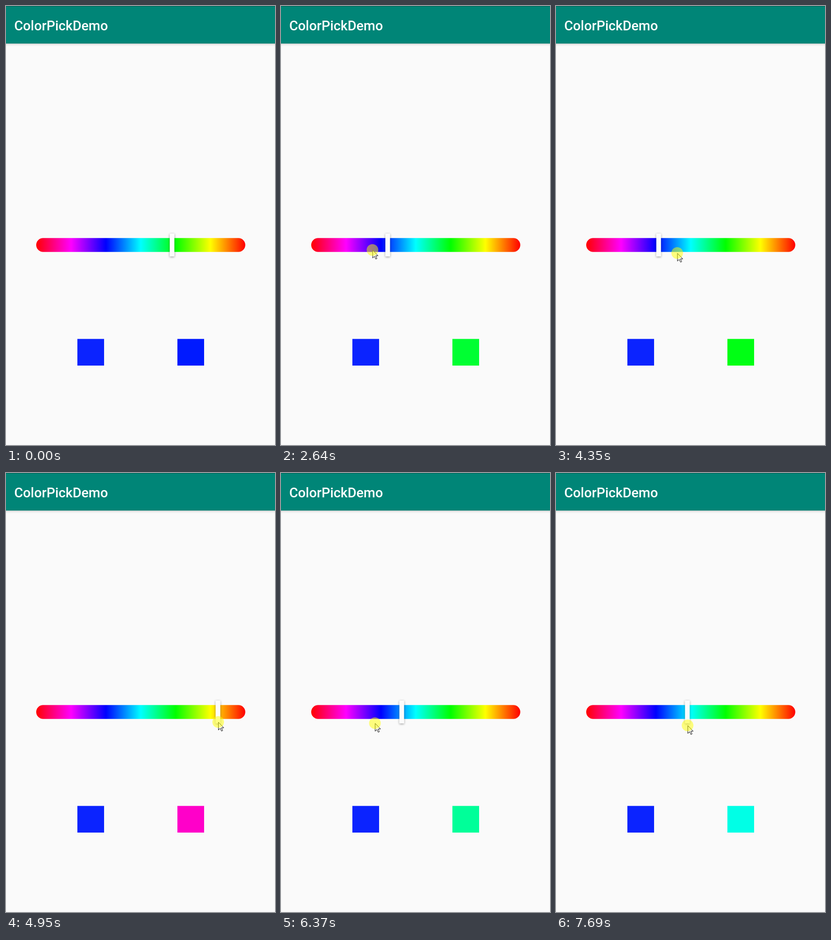
Write an HTML page that moves like this. It is 554 by 901 pixels and loops after 8000 ms.

```html
<!DOCTYPE html>
<html lang="en">
<head>
<meta charset="utf-8">
<title>Color picker</title>
<style>
  html, body { margin: 0; width: 100%; height: 100%; overflow: hidden; background: #fafafa; }
  svg { display: block; width: 100%; height: 100%; }
  text { font: 500 27.7px Roboto, sans-serif; fill: #fff; }
</style>
</head>
<body>
<svg viewBox="0 0 554 901">
  <defs>
    <linearGradient id="hues">
      <stop offset="0" stop-color="#f00"/>
      <stop offset=".1667" stop-color="#f0f"/>
      <stop offset=".3333" stop-color="#00f"/>
      <stop offset=".5" stop-color="#0ff"/>
      <stop offset=".6667" stop-color="#0f0"/>
      <stop offset=".8333" stop-color="#ff0"/>
      <stop offset="1" stop-color="#f00"/>
    </linearGradient>
    <linearGradient id="fade" x2="0" y2="1">
      <stop offset="0" stop-opacity=".2"/>
      <stop offset=".4" stop-opacity=".06"/>
      <stop offset="1" stop-opacity="0"/>
    </linearGradient>
    <filter id="shadow" x="-150%" y="-20%" width="400%" height="140%">
      <feDropShadow dx="0" dy="1.2" stdDeviation="2" flood-opacity=".42"/>
    </filter>
  </defs>
  <rect width="554" height="901" fill="#fafafa"/>
  <rect y="77" width="554" height="6" fill="url(#fade)"/>
  <rect width="554" height="77" fill="#008577"/>
  <rect width="554" height="1" fill="#005f54"/>
  <text x="17" y="50">ColorPickDemo</text>
  <rect x="62.2" y="476.2" width="430.6" height="28.6" rx="14.3" fill="url(#hues)"/>
  <rect id="thumb" x="-4.75" y="467" width="9.5" height="47" rx="1" fill="#fcfcfc" filter="url(#shadow)"/>
  <rect x="147" y="683.3" width="55" height="54.7" fill="#0b23ff"/>
  <rect id="swatch" x="353" y="683.3" width="55" height="54.7"/>
  <g id="pointer">
    <path d="M.5 .5V16.5L4.2 13L6.8 18.7L9.2 17.6L6.7 12H11.5Z" fill="#fff" stroke="#111" stroke-width="1"/>
    <circle id="press" r="12" fill="#ff0" fill-opacity=".5"/>
  </g>
</svg>
<script>
const LOOP = 8000, STEP = 80, LAG = 85, SHOW = 270, PRESS = 1990;
const START = [392, 727], REST = 342;
const el = id => document.getElementById(id);
const thumb = el('thumb'), swatch = el('swatch'), pointer = el('pointer'), press = el('press');

// Strokes of the pointer: first update, last update, final x and y
const strokes = [
  [270, 360, 286, 545], [740, 820, 258, 532], [970, 1520, 338, 496], [1840, 1840, 338, 497],
  [2220, 2870, 136, 502], [3330, 3330, 101, 504], [3940, 4860, 437, 511], [5030, 5280, 465, 506],
  [5430, 5790, 490, 498], [5870, 6680, 66, 520], [6980, 7070, 120, 523], [7150, 7600, 271, 518]
];

const smooth = u => u * u * (3 - 2 * u);

// Pointer position, updated in even steps along each stroke
function pose(t) {
  let [x, y] = START;
  for (const [first, last, toX, toY] of strokes) {
    if (t < first) break;
    const gaps = Math.round((last - first) / STEP);
    const done = gaps ? Math.floor((t - first) / (last - first) * gaps + 1e-6) : 0;
    const u = smooth(Math.min(1, (done + 1) / (gaps + 1)));
    x += (toX - x) * u;
    y += (toY - y) * u;
  }
  return [x, y];
}

function draw(t) {
  const [x, y] = pose(t);
  const pressed = t >= PRESS;
  const pos = pressed ? pose(t - LAG)[0] - 0.5 : REST;
  pointer.setAttribute('visibility', t < SHOW ? 'hidden' : 'visible');
  pointer.setAttribute('transform', `translate(${x} ${y})`);
  press.setAttribute('display', pressed ? 'inline' : 'none');
  thumb.setAttribute('transform', `translate(${pos} 0)`);
  swatch.setAttribute('fill', `hsl(${(pos - 62) * 360 / 431}, 100%, 50%)`);
}

const begin = performance.now();
function tick() {
  draw((performance.now() - begin) % LOOP);
  requestAnimationFrame(tick);
}
tick();
</script>
</body>
</html>
```
